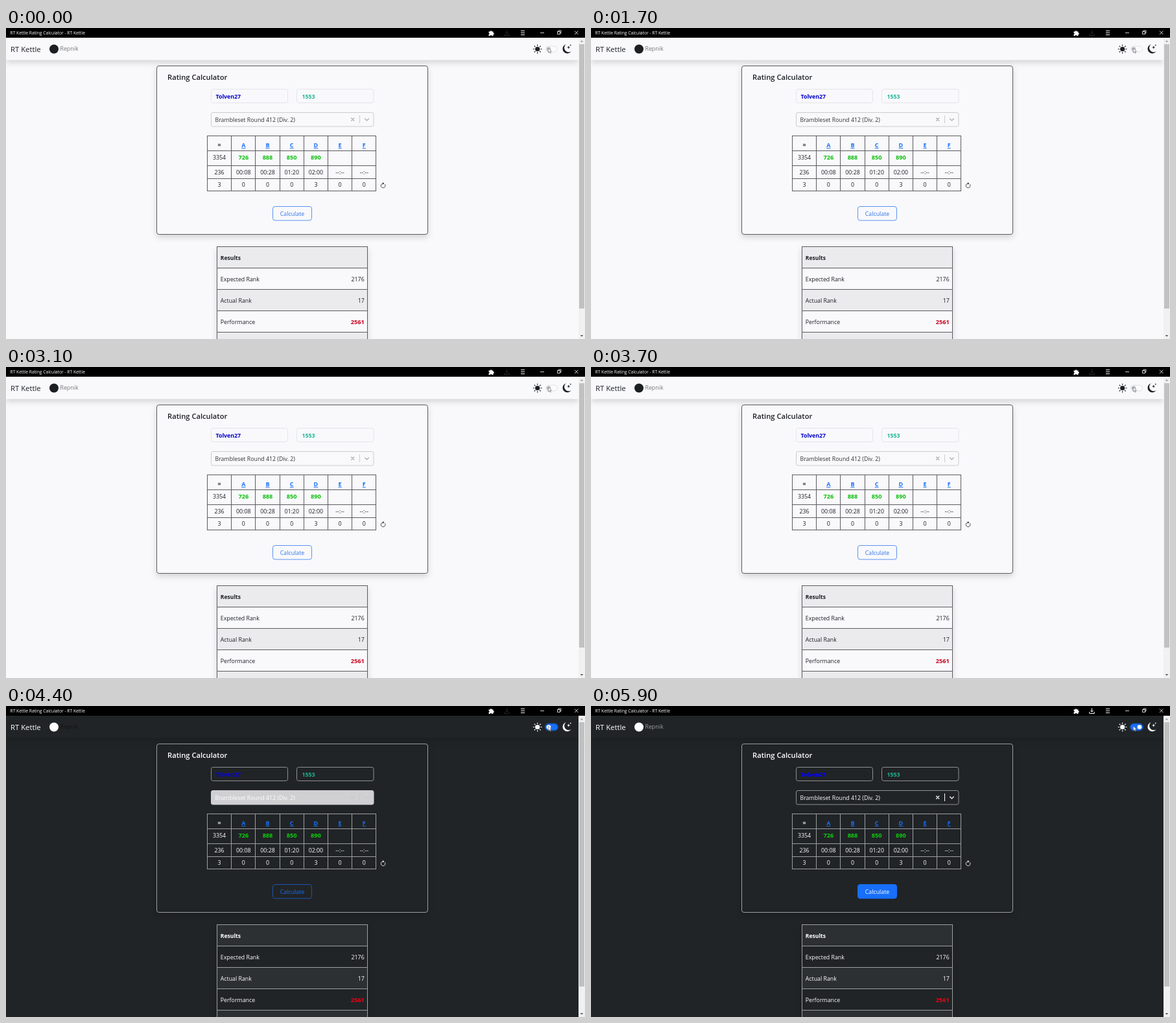
An HTML page that plays this animation: 893x480 px, repeating every 6 s.

```html
<!DOCTYPE html>
<html lang="en">
<head>
<meta charset="utf-8">
<title>Rating Calculator</title>
<style>
html, body { margin: 0; width: 100%; height: 100%; overflow: hidden; background: #000; }
svg {
  display: block; font: 8.8px "Open Sans", "Noto Sans", sans-serif;
  --p: 0%; --ring: 0%;
  --bg: #f9f9fc; --ink: #1c1f22; --line: #5c5c60; --stripe: #ebebee; --field: #e4e5e9;
  --name: #0000c8; --ok: #0abf0a; --perf: #c8001e; --link: #777; --download: #262626;
  --select: #f9f9fc; --select-line: #ccc; --select-ink: #333; --select-icon: #aaa; --split: #ccc;
  --button: #f9f9fc; --button-line: #5a93ef; --button-ink: #2f74e6;
  --track: #fbfbfd; --track-line: color-mix(in srgb, #e2e2e6, #86b7fe var(--ring));
  --thumb: color-mix(in srgb, #bfbfc2, #86b7fe var(--ring)); --glow: #c5d9fb;
}
svg.dark {
  --bg: #212426; --ink: #fff; --line: #9c9ea0; --stripe: #2d3033; --field: #8f9193;
  --name: #00f; --ok: #0cd00c; --perf: #f00014;
  --link: color-mix(in srgb, #101112, #9b9c9d var(--p));
  --download: color-mix(in srgb, #262626, #fff var(--p));
  --select: color-mix(in srgb, #d0d0d2, #212426 var(--p));
  --select-line: color-mix(in srgb, #d0d0d2, #8f9193 var(--p)); --select-ink: #fff;
  --select-icon: color-mix(in srgb, #cacacc, #fff var(--p)); --split: var(--select-icon);
  --button: color-mix(in srgb, #212426, #176ffb var(--p));
  --button-line: color-mix(in srgb, #1c54b0, #176ffb var(--p));
  --button-ink: color-mix(in srgb, #176ffb, #fff var(--p));
  --track: #176ffb; --track-line: #176ffb; --thumb: #fff; --glow: #1c3a68;
}
text { fill: var(--ink); }
.bold { font-weight: 700; }
.mid { text-anchor: middle; }
.end { text-anchor: end; }
.shadow { filter: drop-shadow(0 4.5px 4.6px rgba(0, 0, 0, .15)); }
.panel { fill: var(--bg); stroke: var(--line); }
.grid { fill: none; stroke: var(--line); shape-rendering: crispEdges; }
.field { fill: var(--bg); stroke: var(--field); }
.icon { fill: none; stroke: var(--ink); stroke-linecap: round; }
.chrome { fill: none; stroke: #fff; }
</style>
</head>
<body>
<svg id="stage" width="893" height="480" viewBox="0 0 893 480">
  <rect width="893" height="480" fill="var(--bg)"/>

  <g class="shadow">
    <rect class="panel" x="232.5" y="58.5" width="418" height="260" rx="3.5"/>
  </g>
  <text x="249" y="80" font-size="11.2" font-weight="600">Rating Calculator</text>
  <rect class="field" x="316.5" y="94.5" width="118" height="21" rx="3"/>
  <text class="bold" x="323.5" y="108.5" style="fill:var(--name)">Tolven27</text>
  <rect class="field" x="448.5" y="94.5" width="118.5" height="21" rx="3"/>
  <text class="bold" x="456.5" y="108.5" style="fill:#20b395">1553</text>

  <rect x="316.5" y="130.5" width="250.5" height="21.5" rx="2.5" fill="var(--select)" stroke="var(--select-line)"/>
  <text x="322.5" y="144.7" style="fill:var(--select-ink)">Brambleset Round 412 (Div. 2)</text>
  <g fill="none" stroke="var(--select-icon)" stroke-width="1.3">
    <path d="M532.3 138.7l4.8 4.8m0-4.8l-4.8 4.8M553.3 139.7l3.2 3.2 3.2-3.2"/>
    <path d="M545.5 135v12" stroke="var(--split)" stroke-width="1"/>
  </g>

  <g id="scores"></g>
  <g class="icon" stroke-width=".8">
    <path d="M582 239.9A3.4 3.4 0 1 0 584.6 241.6"/>
    <path d="M581.4 238.6l1.8 1.3-1.8 1.3z" fill="var(--ink)" stroke-width=".3"/>
  </g>

  <rect x="411.5" y="275.5" width="60" height="21.5" rx="3.5" fill="var(--button)" stroke="var(--button-line)"/>
  <text class="mid" x="441.5" y="290" style="fill:var(--button-ink)">Calculate</text>

  <g id="results"></g>

  <g class="shadow"><rect y="15" width="883" height="34.5" fill="var(--bg)"/></g>
  <text x="7" y="37" font-size="11.3">RT Kettle</text>
  <circle cx="74" cy="32.5" r="7" fill="var(--ink)"/>
  <text x="83.5" y="35.3" style="fill:var(--link)">Repnik</text>

  <circle cx="819.7" cy="32.5" r="3.6" fill="var(--ink)"/>
  <path id="rays" class="icon" stroke-width="1.2"/>

  <rect x="830.5" y="26" width="22" height="13" rx="6.5" fill="var(--glow)" style="opacity:var(--ring)"/>
  <rect x="832.5" y="28" width="18" height="9" rx="4.5" fill="var(--track)" stroke="var(--track-line)"/>
  <circle id="thumb" cx="837" cy="32.5" r="3.3" fill="var(--thumb)"/>
  <path d="M836.3 31v7l1.7-1.5 1.1 2.5 1.2-.5-1.1-2.4h2.2z" fill="#fff" stroke="#555" stroke-width=".6"/>
  <g fill="var(--ink)">
    <path d="M863.7 25.3A7.1 7.1 0 1 0 871.6 36 6.6 6.6 0 0 1 863.7 25.3z"/>
    <path d="M867.7 27.2l.7 2 2 .7-2 .7-.7 2-.7-2-2-.7 2-.7zM870.8 25l.4 1.2 1.2.4-1.2.4-.4 1.2-.4-1.2-1.2-.4 1.2-.4z"/>
  </g>

  <rect x="883" y="15" width="10" height="465" fill="#f1f1f1"/>
  <rect x="884" y="25" width="8" height="408" fill="#c1c1c1"/>
  <path d="M885.7 21.5l2.3-2.6 2.3 2.6z" fill="#999"/>
  <path d="M885.7 474l2.3 2.6 2.3-2.6z" fill="#555"/>

  <rect width="893" height="15" fill="#000"/>
  <text x="6.5" y="10" font-size="6.7" style="fill:#fff">RT Kettle Rating Calculator - RT Kettle</text>
  <path d="M744.5 5.5h2.2a1.3 1.3 0 1 1 2.6 0h2.2v2a1.3 1.3 0 1 1 0 2.6v2h-2.3a1.2 1.2 0 0 0-2.4 0h-2.3v-2.3a1.2 1.2 0 0 0 0-2.4z" fill="#fff"/>
  <path d="M772.5 3.5v5.5m-2.3-2.2l2.3 2.3 2.3-2.3M768.8 9v2.5h7.4V9" fill="none" stroke="var(--download)"/>
  <path class="chrome" d="M794 4.5h6M794 7.5h6M794 10.5h6" stroke-width="1.2"/>
  <path class="chrome" d="M824 7.5h6M850.5 5.5h4v4h-4zM852 5.5v-1.5h4v4h-1.5M877 4.5l5.5 5.5m0-5.5l-5.5 5.5" stroke-width=".8"/>
</svg>
<script>
const $ = id => document.getElementById(id);
const stage = $('stage');
const label = (x, y, text, cls = '', style = '') =>
  `<text x="${x}" y="${y}" class="${cls}" style="${style}">${text}</text>`;

function drawScores() {
  const left = 310.5, step = 37.2, right = left + 7 * step;
  const edges = [166.5, 189.5, 212.5, 232.5, 251.5];
  const baselines = [184, 202.7, 226.2, 245.2];
  const rows = [
    '= A B C D E F',
    '3354 726 888 850 890',
    '236 00:08 00:28 01:20 02:00 --:-- --:--',
    '3 0 0 0 3 0 0'
  ];
  const styles = [
    'fill:#176ffb;text-decoration:underline;font-size:9px',
    'fill:var(--ok);font-size:9.2px'
  ];
  let out = '', lines = '';
  rows.forEach((row, r) => row.split(' ').forEach((cell, c) => {
    const strong = r === 0 || (r === 1 && c > 0);
    const x = (left + (c + .5) * step).toFixed(1);
    out += label(x, baselines[r], cell, strong ? 'mid bold' : 'mid', c ? styles[r] : '');
  }));
  for (const y of edges) lines += `M${left - .5} ${y}H${right + .5}`;
  for (let c = 0; c < 8; c++) lines += `M${Math.floor(left + c * step) + .5} 166V252`;
  $('scores').innerHTML = `<path class="grid" d="${lines}"/>` + out;
}

function drawResults() {
  const top = 337.5, height = 33;
  const rows = [['Results', ''], ['Expected Rank', 2176], ['Actual Rank', 17], ['Performance', 2561], ['', '']];
  let out = '<rect class="shadow" x="325" y="337" width="233" height="150" fill="var(--bg)"/>';
  let lines = 'M325.5 337V480M557.5 337V480', texts = '';
  rows.forEach(([name, value], i) => {
    const y = top + i * height;
    if (i % 2 === 0) out += `<rect x="325" y="${y}" width="233" height="${height}" fill="var(--stripe)"/>`;
    lines += `M325 ${y}H558`;
    texts += label(330.8, y + 20.2, name, i ? '' : 'bold', i ? '' : 'font-size:8.6px');
    texts += label(552.7, y + 20.2, value, i === 3 ? 'end bold' : 'end', i === 3 ? 'fill:var(--perf);font-size:9.2px' : '');
  });
  $('results').innerHTML = `${out}<path class="grid" d="${lines}"/>${texts}`;
}

function drawRays() {
  let d = '';
  for (let i = 0; i < 8; i++) {
    const dx = Math.cos(i * Math.PI / 4), dy = Math.sin(i * Math.PI / 4);
    const point = r => `${(819.7 + dx * r).toFixed(2)} ${(32.5 + dy * r).toFixed(2)}`;
    d += `M${point(5.2)}L${point(6.4)}`;
  }
  $('rays').setAttribute('d', d);
}

const LOOP = 6000, FOCUS = 4200, SWITCH = 4400, FADE = 150;
const progress = (t, from, span) => Math.min(1, Math.max(0, (t - from) / span));
const start = performance.now();

function render() {
  const t = Math.floor(((performance.now() - start) % LOOP) / 100) * 100;
  const fade = progress(t, SWITCH, FADE);
  stage.classList.toggle('dark', t >= SWITCH);
  stage.style.setProperty('--ring', progress(t, FOCUS, 100) * 100 + '%');
  stage.style.setProperty('--p', fade * 100 + '%');
  $('thumb').setAttribute('cx', 837 + 9 * fade);
  requestAnimationFrame(render);
}

drawScores();
drawResults();
drawRays();
render();
</script>
</body>
</html>
```
